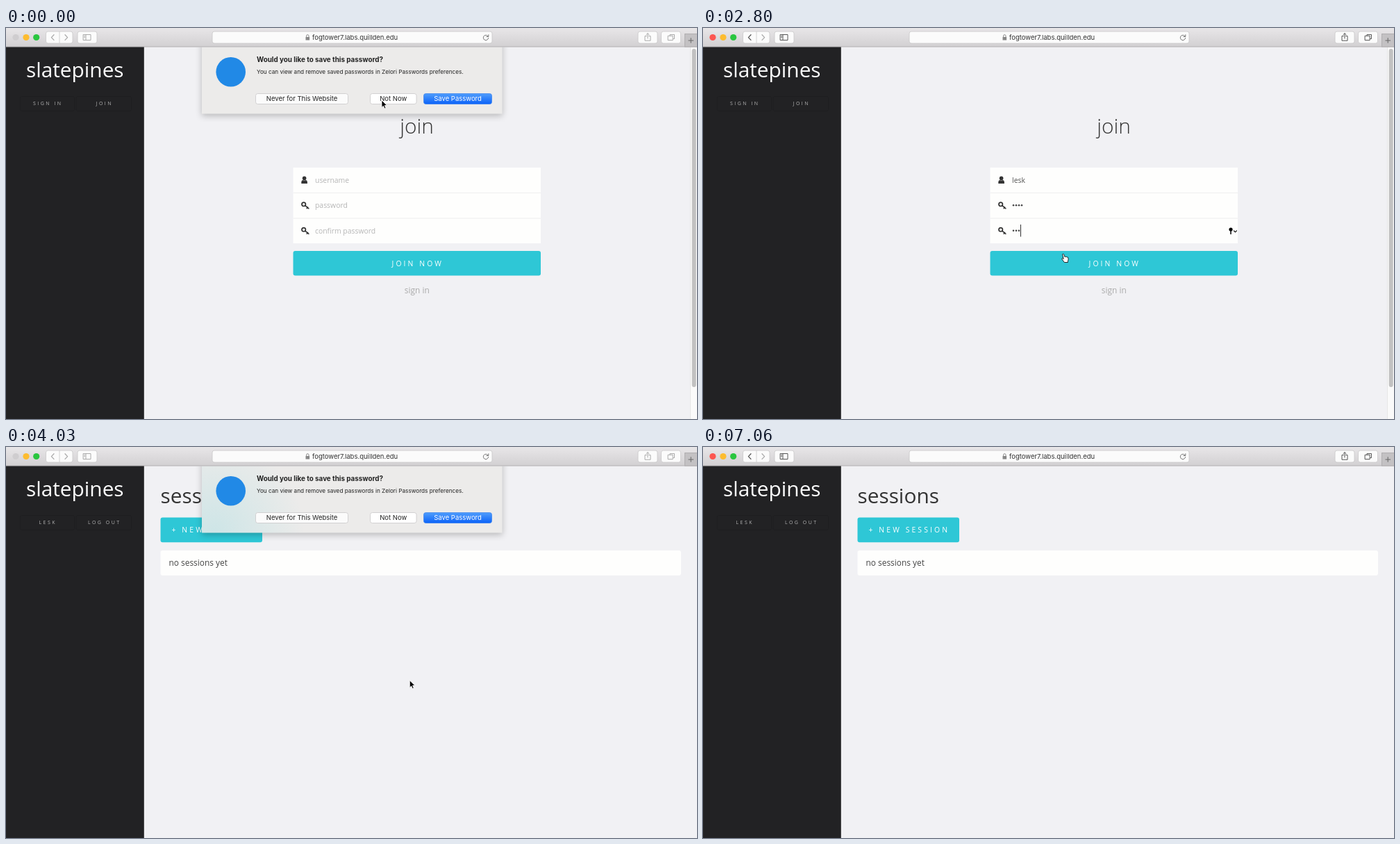
Write an HTML page that moves like this. It is 995 px wide and 563 px high and loops after 7.53 s.

```html
<!DOCTYPE html>
<html lang="en">
<head>
<meta charset="utf-8">
<title>Sign-up flow</title>
<style>
html, body { margin: 0; width: 100%; height: 100%; overflow: hidden; background: #f1f1f4; }
svg { display: block; width: 100vw; height: 100vh; }
text { font-family: "Open Sans", sans-serif; white-space: pre; }
.ui text { font-family: Inter, sans-serif; font-size: 9.5px; }
.mid { text-anchor: middle; }
.head { font-size: 29.8px; fill: #333; }
.field { font-size: 10.4px; fill: #b6b6b6; }
.typed { fill: #555; }
.body { font-size: 11.9px; }
.caps { font-size: 10.4px; letter-spacing: 3.1px; fill: #fff; }
.nav { font-size: 7px; letter-spacing: 2.5px; fill: #b4b4b4; text-anchor: middle; }
.line { fill: none; stroke: currentColor; stroke-linecap: round; stroke-linejoin: round; }
.btn { fill: #fbfbfb; stroke: #c9c8c9; stroke-width: .8; }
#sheet { filter: drop-shadow(0 3px 5px rgba(0, 0, 0, .24)); }
</style>
</head>
<body>
<svg viewBox="0 0 995 563" preserveAspectRatio="none">
  <defs>
    <linearGradient id="bar" x2="0" y2="1"><stop stop-color="#e8e6e8"/><stop offset="1" stop-color="#d2d0d2"/></linearGradient>
    <linearGradient id="blue" x2="0" y2="1"><stop stop-color="#4f9dfc"/><stop offset="1" stop-color="#0b62f8"/></linearGradient>
    <radialGradient id="glow" gradientUnits="userSpaceOnUse" cx="300" cy="122" r="130"><stop stop-color="#2ec7d6" stop-opacity=".16"/><stop offset="1" stop-color="#2ec7d6" stop-opacity="0"/></radialGradient>
    <clipPath id="below"><rect y="27.5" width="995" height="536"/></clipPath>
    <g id="key" class="line" color="#333"><circle cx="428.7" cy="-1.7" r="2.7" stroke-width="1.7"/><path d="M430.8 .2L435.8 4.4M433.2 4.2l1.4-1.6" stroke-width="1.6"/></g>
  </defs>
  <rect width="995" height="563" fill="#f1f1f4"/>

  <g id="joinPage">
    <text class="head mid" x="591.5" y="152" font-weight="300">join</text>
    <rect x="413.5" y="201" width="356.5" height="109" fill="#fefefd"/>
    <path d="M413.5 237.3h356.5M413.5 274h356.5" stroke="#eee"/>
    <g fill="#333"><circle cx="429.6" cy="216.4" r="2.8"/><path d="M425.3 224v-2.2q0-2.6 2.3-2.8q2 1.2 4 0q2.3.2 2.3 2.8v2.2z"/></g>
    <use href="#key" y="255.5"/><use href="#key" y="292"/>
    <text class="field" x="445" y="222.5"></text>
    <text class="field" x="445" y="259">password</text>
    <text class="field" x="445" y="295.5">confirm password</text>
    <g id="dots" fill="#444"></g>
    <rect id="caret" width="1" height="17.5" fill="#333"/>
    <g id="fill" color="#111"><circle cx="760" cy="-2" r="2.6"/><path class="line" d="M760-1v5.5" stroke-width="1.6"/><path class="line" d="M764.5 0l1.9 1.9 1.9-1.9" stroke-width="1.2"/></g>
    <rect id="join" x="413.5" y="321" width="356.5" height="35.5" rx="3"/>
    <text class="caps" x="555.5" y="342.5">JOIN NOW</text>
    <text class="body mid" x="591.8" y="381.5" fill="#aaa">sign in</text>
    <rect x="985.5" y="27" width="9.5" height="536" fill="#fafafa"/>
    <path d="M985.5 27v536" stroke="#e6e6e6"/>
    <rect x="987.7" y="30" width="6" height="487" rx="3" fill="#c1c1c1"/>
  </g>

  <g id="listPage">
    <text class="head" x="222.5" y="80.5">sessions</text>
    <rect x="222.5" y="101.5" width="146.5" height="35.8" rx="3" fill="#2ec7d6"/>
    <text class="caps" x="238.5" y="123">+ NEW SESSION</text>
    <rect x="222.5" y="149" width="749.5" height="36" rx="3" fill="#fefefd"/>
    <text class="body" x="234.5" y="171.2" fill="#444">no sessions yet</text>
  </g>

  <rect y="27" width="198.8" height="536" fill="#222224"/>
  <text class="head mid" x="99.3" y="71" style="fill:#fff">slatepines</text>
  <g fill="none" stroke="#1e1e20"><rect x="20.5" y="98.5" width="78" height="21" rx="2"/><rect x="101" y="98.5" width="79.5" height="21" rx="2"/></g>
  <text class="nav" x="60.3" y="111.2"></text>
  <text class="nav" x="141.8" y="111.2"></text>

  <g clip-path="url(#below)" class="ui"><g id="sheet">
    <rect x="282" y="0" width="432.5" height="123.5" fill="#ecebea"/>
    <rect id="tint" x="282" y="0" width="432.5" height="123.5" fill="url(#glow)"/>
    <circle cx="323.7" cy="63.2" r="21.3" fill="#2189e6"/>
    <text x="361" y="49" font-weight="700" style="font-size:9.84px" fill="#222">Would you like to save this password?</text>
    <text x="361" y="65.5" style="font-size:8.18px" fill="#222">You can view and remove saved passwords in Zelori Passwords preferences.</text>
    <rect class="btn" x="359.5" y="94.5" width="133" height="15" rx="3"/>
    <rect class="btn" id="later" x="524.5" y="94.5" width="66.5" height="15" rx="3"/>
    <rect class="btn" id="save" x="601.5" y="94.5" width="98" height="15" rx="3"/>
    <text class="mid" x="426" y="105.4" fill="#222">Never for This Website</text>
    <text class="mid" id="laterText" x="557.7" y="105.4">Not Now</text>
    <text class="mid" id="saveText" x="650.5" y="105.4">Save Password</text>
  </g></g>

  <g class="ui">
    <rect width="995" height="27" fill="url(#bar)"/>
    <path d="M0 27h995" stroke="#b1afb1"/>
    <circle id="close" cx="14" cy="13.5" r="4.6"/>
    <circle cx="29" cy="13.5" r="4.6" fill="#fdbc2f"/>
    <circle cx="43.7" cy="13.5" r="4.6" fill="#2ac63f"/>
    <g class="btn">
      <rect x="57.5" y="5" width="38.5" height="17" rx="3"/><rect x="103" y="5" width="28" height="17" rx="3"/>
      <rect x="297" y="5" width="403" height="17" rx="3"/><rect x="910" y="5" width="28" height="17" rx="3"/>
      <rect x="943.5" y="5" width="28" height="17" rx="3"/><path d="M77 5v17"/>
    </g>
    <rect x="977.5" y="8.5" width="18" height="18.5" fill="#c3c1c3" stroke="#b0aeb0"/>
    <path d="M982.5 18h7.5M986.2 14.2v7.5" stroke="#666"/>
    <g id="icons" class="line" stroke-width="1">
      <path d="M69 9.8l-3.6 3.8 3.6 3.8" stroke-width="1.3"/>
      <path d="M111.5 9.5h10.5v8h-10.5zM115 9.5v8M112.7 11.6h1M112.7 13.4h1"/>
      <path d="M922.3 11.5h-2.3v6.7h8v-6.7h-2.3M924 15v-7.2M922 9.6l2-2 2 2"/>
      <path d="M956 11v-1.5h6.5v6h-1.7M953.5 11.3h6.7v6.3h-6.7z"/>
    </g>
    <path class="line" color="#aaa" d="M85 9.8l3.6 3.8-3.6 3.8" stroke-width="1.3"/>
    <g color="#888"><path d="M431.5 13h5.6v4.5h-5.6z" fill="currentColor"/><path class="line" d="M432.6 13v-1.6a1.7 1.7 0 0 1 3.4 0v1.6"/></g>
    <text x="441" y="17.2" fill="#333">fogtower7.labs.quillden.edu</text>
    <path class="line" color="#777" d="M694.3 12.2a3.7 3.7 0 1 0 .4 2.2M694.8 9.7v2.8h-2.8"/>
  </g>

  <g id="cursor">
    <path id="arrow" d="M0 0v10.4l2.4-2.2 1.7 3.8 1.8-.8-1.6-3.7h3.3z" fill="#000" stroke="#fff" stroke-width=".8"/>
    <path id="beam" class="line" color="#333" d="M-2.5-6q2 0 2.5 1.2q.5-1.2 2.5-1.2M0-4.8v9.6M-2.5 6q2 0 2.5-1.2q.5 1.2 2.5 1.2" stroke-width="1.1"/>
    <path id="hand" d="M-1.4.8q1.4-1.4 2.2.4l1 3.3q1-.7 1.7.1q1-.5 1.7.3q1.5-.2 1.7 1.3q.5 3-.6 4.6v1.7h-4.9l-3.4-4.5q-.7-1.3.4-1.6q.9 0 1.8 1.2z" fill="#fff" stroke="#111" stroke-width=".9"/>
  </g>
</svg>
<script>
const LOOP = 7530;
const $ = id => document.getElementById(id);
const show = (id, on) => $(id).style.display = on ? '' : 'none';
const paint = (id, fill) => $(id).style.fill = fill;
const within = (t, a, b) => t >= a && t < b;

// Eased value of [time, ...values] stops.
function track(stops, t) {
  const next = stops.findIndex(s => s[0] > t);
  if (next === 0) return stops[0].slice(1);
  if (next < 0) return stops.at(-1).slice(1);
  const a = stops[next - 1], b = stops[next];
  const u = (t - a[0]) / (b[0] - a[0]), e = u * u * (3 - 2 * u);
  return a.slice(1).map((v, i) => v + (b[i + 1] - v) * e);
}

const pointer = [
  [30, 541, 104], [300, 539, 112], [760, 520, 212], [800, 520, 212], [1440, 520, 293],
  [2690, 520, 293], [2800, 519, 325], [3000, 545, 361], [3130, 570, 361], [3360, 581.3, 336],
  [4160, 581.3, 336], [4250, 589, 321], [4430, 600, 138], [4600, 600, 138], [4900, 560, 100],
  [5360, 560, 100], [5830, 550, 98], [6030, 550, 98], [6530, 545, 98], [6800, 545, 98],
  [6850, 541, 98], [7025, 918, 118], [7055, 1012, 118]
];
const slide = [[150, 0], [400, -110], [3500, -110], [3750, 0], [5190, 0], [5440, -110]];
const hover = [[2800, 0], [2940, 1], [3000, 1], [3120, 0], [3190, 0], [3340, 1]];
const user = 'lesk';
const keys = [[1630, 1700, 1780, 1860], [2060, 2150, 2240, 2330], [2550, 2640, 2730, 2870]];
const focusAt = [430, 1950, 2430];
const rows = [219, 255.5, 292];
const fields = document.querySelectorAll('.field');
const nav = document.querySelectorAll('.nav');

function drawForm(t) {
  const counts = keys.map(list => list.filter(k => t >= k).length);
  const focus = focusAt.filter(f => t >= f).length - 1;
  fields[0].textContent = user.slice(0, counts[0]) || 'username';
  fields[0].classList.toggle('typed', counts[0] > 0);
  let dots = '';
  for (const row of [1, 2]) {
    fields[row].style.display = counts[row] ? 'none' : '';
    for (let i = 0; i < counts[row]; i++)
      dots += `<circle cx="${447 + 4 * i}" cy="${rows[row] - .3}" r="1.3"/>`;
  }
  $('dots').innerHTML = dots;

  const active = within(t, 430, 3500);
  show('caret', active && !within(t, 1250, 1630));
  show('fill', active && focus > 0);
  if (active) {
    const width = focus ? 4 * counts[focus] : counts[0] && fields[0].getComputedTextLength();
    $('caret').setAttribute('x', 445 + width);
    $('caret').setAttribute('y', rows[focus] - 9);
    $('fill').setAttribute('transform', `translate(0 ${rows[focus]})`);
  }
  const [h] = track(hover, t);
  paint('join', `rgb(${46 - 5 * h},${199 - 22 * h},${214 - 26 * h})`);
}

function drawSheet(t) {
  const [y] = track(slide, t);
  const pressed = within(t, 70, 430) || within(t, 5000, 5500);
  show('sheet', y > -110);
  $('sheet').setAttribute('transform', `translate(0 ${y})`);
  for (const [id, on] of [['later', pressed], ['save', !pressed]]) {
    paint(id, on ? 'url(#blue)' : '#fff');
    $(id).style.stroke = on ? '#3f86ee' : '';
    paint(id + 'Text', on ? '#fff' : '#222');
  }
}

function drawPointer(t, active) {
  const [x, y] = track(pointer, t);
  const onForm = active && t < 3500;
  const kind = onForm && within(y, 201, 311) ? 'beam' : onForm && within(y, 321, 357) ? 'hand' : 'arrow';
  for (const id of ['arrow', 'beam', 'hand']) show(id, id === kind);
  show('cursor', !within(t, 1650, 2690));
  $('cursor').setAttribute('transform', `translate(${x} ${y})`);
}

function draw(now) {
  const t = now % LOOP;
  const joined = t >= 4000;
  const active = !(t < 430 || within(t, 3500, 5500));
  show('joinPage', !joined);
  show('listPage', joined);
  show('tint', joined);
  nav[0].textContent = joined ? user.toUpperCase() : 'SIGN IN';
  nav[1].textContent = joined ? 'LOG OUT' : 'JOIN';
  paint('close', active ? '#fc5650' : '#cfcdcf');
  $('icons').style.color = active ? '#555' : '#aaa';
  if (!joined) drawForm(t);
  drawSheet(t);
  drawPointer(t, active);
}

const start = performance.now();
function tick() {
  draw(performance.now() - start);
  requestAnimationFrame(tick);
}
tick();
</script>
</body>
</html>
```
